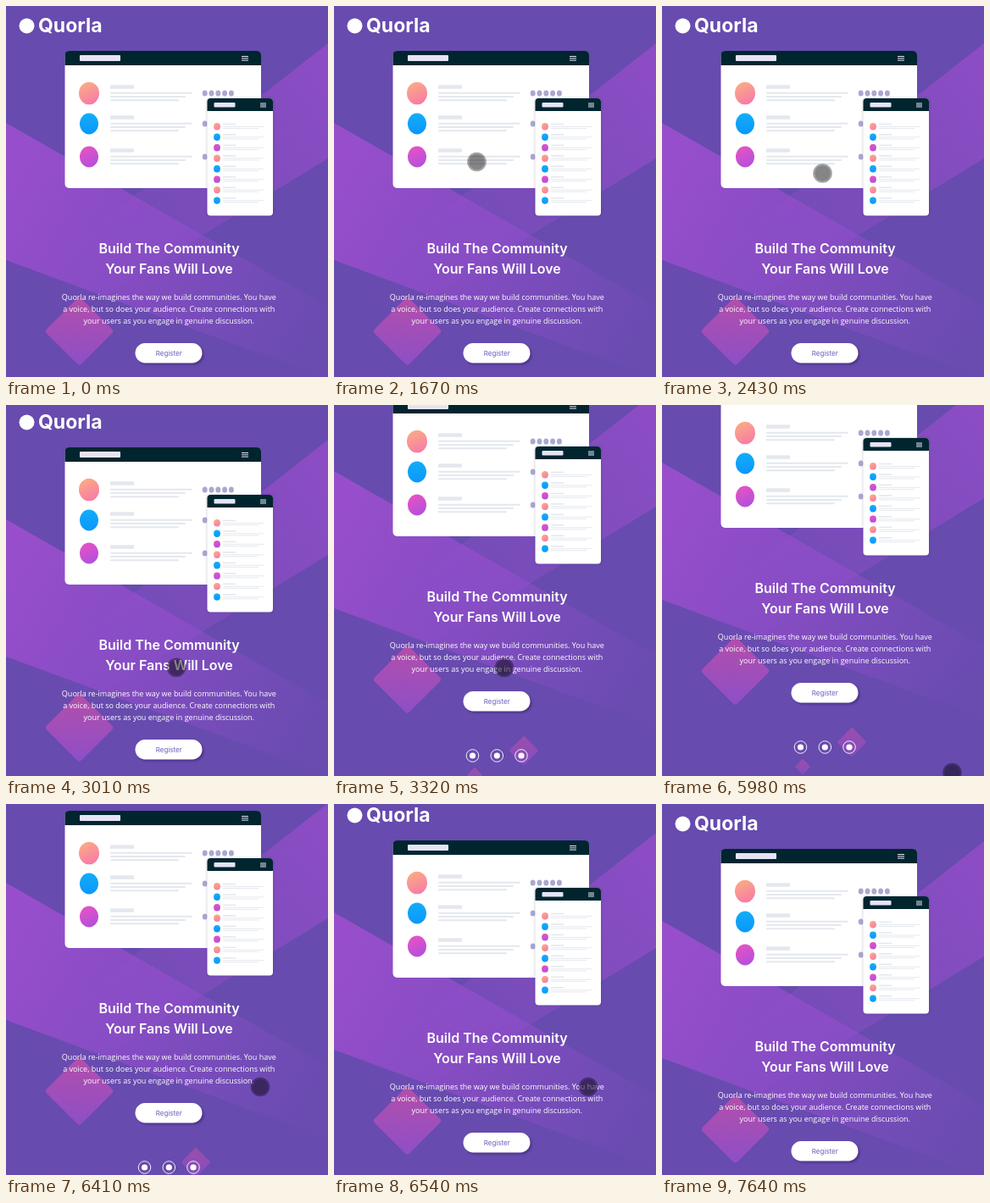
An HTML page that plays this animation: 380 px wide and 438 px high, repeating every 8.08 s.

```html
<!DOCTYPE html>
<html lang="en">
<head>
<meta charset="utf-8">
<title>Community landing page</title>
<style>
  html, body { margin: 0; width: 100%; height: 100%; overflow: hidden; background: #674bae; }
  svg { display: block; width: 100%; height: 100%; }
  text { fill: #fff; }
  .logo { font: 700 23px Inter, sans-serif; }
  .title { font: 600 16px Inter, sans-serif; text-anchor: middle; }
  .copy { font: 400 9px "Open Sans", sans-serif; text-anchor: middle; }
  .button text { font: 400 8px Inter, sans-serif; text-anchor: middle; fill: #6c5bbd; }
  .button rect { fill: #fff; filter: drop-shadow(2px 2px 1px rgba(45, 25, 95, .45)); }
  .phone { filter: drop-shadow(0 0 1.5px rgba(40, 30, 90, .3)); }
</style>
</head>
<body>
<svg viewBox="0 0 380 438">
  <defs>
    <linearGradient id="leftBand" gradientUnits="userSpaceOnUse" x1="0" y1="190" x2="360" y2="400">
      <stop stop-color="#a34fd2" stop-opacity=".82"/>
      <stop offset=".5" stop-color="#9a4dd0" stop-opacity=".55"/>
      <stop offset="1" stop-color="#8a50cc" stop-opacity=".08"/>
    </linearGradient>
    <linearGradient id="rightBand" gradientUnits="userSpaceOnUse" x1="380" y1="90" x2="40" y2="370">
      <stop stop-color="#a04dd0" stop-opacity=".65"/>
      <stop offset=".55" stop-color="#984fd0" stop-opacity=".32"/>
      <stop offset="1" stop-color="#8550c8" stop-opacity="0"/>
    </linearGradient>
    <linearGradient id="diamond" x2="1" y2="1">
      <stop stop-color="#c24fa8"/><stop offset="1" stop-color="#944fcd"/>
    </linearGradient>
    <linearGradient id="peach" x1=".3" x2=".7" y2="1">
      <stop stop-color="#fbab84"/><stop offset="1" stop-color="#f77aa8"/>
    </linearGradient>
    <linearGradient id="blue" x2="0" y2="1">
      <stop stop-color="#12adf8"/><stop offset="1" stop-color="#0b97fc"/>
    </linearGradient>
    <linearGradient id="magenta" x1=".3" x2=".7" y2="1">
      <stop stop-color="#e753c4"/><stop offset="1" stop-color="#b14fdd"/>
    </linearGradient>
  </defs>

  <g id="page">
    <rect width="380" height="508" fill="#674bae"/>
    <path d="M0 138 380 355V440L0 300Z" fill="url(#leftBand)"/>
    <path d="M380 44V180L0 412V343Z" fill="url(#rightBand)"/>
    <g id="diamonds" fill="url(#diamond)"></g>

    <circle cx="24.5" cy="23.5" r="9" fill="#fff"/>
    <text class="logo" x="38" y="31">Quorla</text>

    <g id="browser"></g>
    <g id="phone" class="phone"></g>

    <text class="title" x="192.5" y="292">Build The Community</text>
    <text class="title" x="192.5" y="315.5">Your Fans Will Love</text>
    <text class="copy" x="192.3" y="347">Quorla re-imagines the way we build communities. You have</text>
    <text class="copy" x="192.3" y="361">a voice, but so does your audience. Create connections with</text>
    <text class="copy" x="192.3" y="375">your users as you engage in genuine discussion.</text>

    <g class="button">
      <rect x="152.5" y="398" width="79" height="23.5" rx="11.75"/>
      <text x="192.3" y="412.8">Register</text>
    </g>
    <g id="social" fill="#fff"></g>
  </g>

  <g id="cursor">
    <circle r="9.5" fill="#000" fill-opacity=".48"/>
    <circle r="10.4" fill="none" stroke="#000" stroke-opacity=".36" stroke-width="1.8"/>
  </g>
</svg>
<script>
const $ = id => document.getElementById(id);
const rect = (x, y, w, h, fill, rx = 0) =>
  `<rect x="${x}" y="${y}" width="${w}" height="${h}" rx="${rx}" fill="${fill}"/>`;
const ellipse = (x, y, rx, ry, fill) =>
  `<ellipse cx="${x}" cy="${y}" rx="${rx}" ry="${ry}" fill="${fill}"/>`;
const gradients = ["url(#peach)", "url(#blue)", "url(#magenta)"];
const INK = "#00252f", BAR = "#e4e8ee", PALE = "#e6e4f4", DOT = "#aaa8cf";

function panel(x, y, w, h, headerHeight, radius) {
  const bottom = y + headerHeight;
  return rect(x, y, w, h, "#fff", radius) +
    `<path d="M${x} ${bottom}v${radius - headerHeight}q0-${radius} ${radius}-${radius}h${w - 2 * radius}` +
    `q${radius} 0 ${radius} ${radius}v${headerHeight - radius}z" fill="${INK}"/>`;
}
const menu = (x, y, w, gap) =>
  [0, 1, 2].map(i => rect(x, y + i * gap, w, 1, PALE)).join("");

function browserRow(y, i) {
  const lines = [97, 89, 81].map((w, k) => rect(123, y - 1.2 + k * 4.2, w, 2, BAR, 1)).join("");
  const dots = Array.from({ length: i ? 1 : 5 }, (_, k) =>
    ellipse(234.7 + k * 7.8, y, 3, 3.5, DOT)).join("");
  const size = i ? [11, 12.5] : [12, 13.3];
  return ellipse(98, y, ...size, gradients[i]) + rect(123, y - 9.7, 28, 4.5, BAR) + lines + dots;
}
function phoneRow(i) {
  const y = 142.3 + i * 12.47;
  return ellipse(249, y, 3.9, 4.2, gradients[i % 3]) + rect(256, y - 3.6, 15, 1.6, BAR) +
    rect(256, y - .4, 48, 1, BAR) + rect(256, y + 1.7, 42, 1, BAR);
}
$("browser").innerHTML = panel(69.5, 53, 231.5, 162, 17, 5) + rect(87, 58, 48, 7, PALE, 1) +
  menu(278, 59, 8, 2.3) + [103, 139, 178].map(browserRow).join("");
$("phone").innerHTML = panel(237.5, 109, 77.5, 138.5, 15, 4) + rect(245.5, 114, 25, 5.5, PALE, 1) +
  menu(300, 114.5, 7, 2) + Array.from({ length: 8 }, (_, i) => phoneRow(i)).join("");

$("diamonds").innerHTML = [[86.5, 384, 58, .85], [224, 468, 25, .6], [166, 497, 13, .6]]
  .map(([x, y, s, opacity]) => `<rect x="${-s / 2}" y="${-s / 2}" width="${s}" height="${s}" ` +
    `rx="${s * .06}" opacity="${opacity}" transform="translate(${x} ${y}) rotate(45)"/>`).join("");
$("social").innerHTML = [163.5, 192.3, 221].map(x =>
  `<circle cx="${x}" cy="474" r="7.3" fill="none" stroke="#fff" stroke-width=".9"/>
   <circle cx="${x}" cy="474" r="3.6"/>`).join("");

// Each move: start, end, number of steps, evenly timed path points.
const LOOP = 8080;
const scrollMoves = [
  [2950, 3010, 2, [[0], [1], [3]]],
  [3180, 3450, 5, [[3], [18], [43], [60], [67], [70]]],
  [6340, 6690, 6, [[70], [63], [45], [25], [10], [3], [0]]],
];
// Points below the stage hide the cursor.
const cursorMoves = [
  [480, 930, 8, [[314, 448], [308, 402], [298, 367], [292, 348], [290.5, 341.5]]],
  [1070, 1480, 6, [[290.5, 341.5], [291, 330], [289, 300], [284, 265], [279, 240], [276.5, 225.5], [276, 500]]],
  [1630, 1670, 2, [[187, 186], [178, 184.5], [168.5, 184]]],
  [1880, 2630, 12, [[168.5, 184], [132, 160], [110.5, 118], [140, 90.5], [178, 150], [201, 245], [200, 295]]],
  [2700, 2750, 2, [[200, 295], [200.5, 304], [201, 310]]],
  [3970, 4260, 5, [[201, 310], [202, 330], [206, 362], [212, 396], [217, 421], [218.5, 428]]],
  [5050, 5130, 2, [[218.5, 428], [259, 436], [262, 480]]],
  [5980, 6150, 3, [[350, 480], [342.5, 434], [315, 366], [300, 334]]],
  [7150, 7640, 8, [[300, 334], [302, 340], [310, 360], [326, 395], [340, 455]]],
];

function along(path, p) {
  const s = p * (path.length - 1);
  const i = Math.min(Math.floor(s), path.length - 2);
  return path[i].map((v, k) => v + (path[i + 1][k] - v) * (s - i));
}
function poseAt(moves, t, rest) {
  const move = moves.findLast(([start]) => t >= start);
  if (!move) return rest;
  const [start, end, steps, path] = move;
  const step = Math.floor((t - start) / (end - start) * (steps - 1) + .2);
  return along(path, Math.min(1, (step + 1) / steps));
}

function draw(now) {
  const t = now % LOOP;
  const [scroll] = poseAt(scrollMoves, t, [0]);
  const [x, y] = poseAt(cursorMoves, t, [0, 500]);
  $("page").setAttribute("transform", `translate(0 ${-scroll})`);
  $("cursor").setAttribute("transform", `translate(${x} ${y})`);
}
const began = performance.now();
function frame() {
  draw(performance.now() - began);
  requestAnimationFrame(frame);
}
frame();
</script>
</body>
</html>
```
